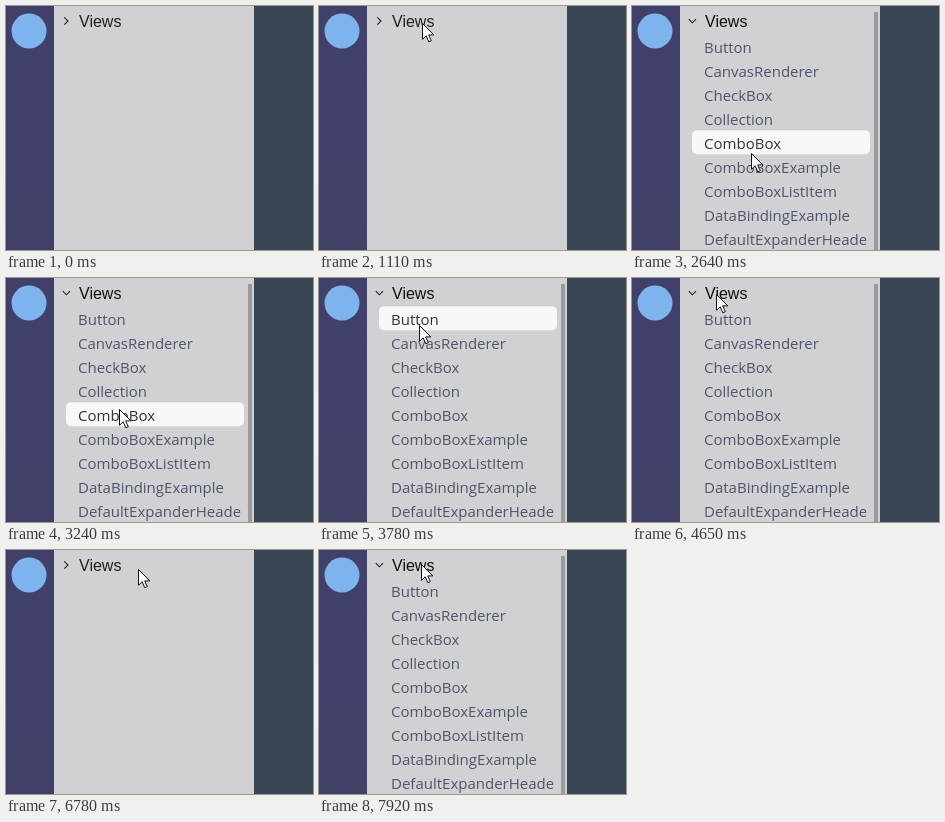
These frames come from a looping animation (307x244 px, 8 s). An HTML page:

```html
<!DOCTYPE html>
<html lang="en">
<head>
<meta charset="utf-8">
<title>Tree menu</title>
<style>
  html, body { margin: 0; width: 100%; height: 100%; overflow: hidden; background: #394552; }
  svg { display: block; width: 307px; height: 244px; }
  .title { font: 16px "Liberation Sans", Arial, sans-serif; fill: #202022; }
  .open .title { fill: #101010; }
  .item { font: 15px "Open Sans", "Noto Sans", sans-serif; fill: #4b566a; }
  .item.on { fill: #333; }
  .arrow { fill: none; stroke: #222; stroke-width: 1.1; }
  #list, #down { display: none; }
  .open #list, .open #down { display: inline; }
  .open #right { display: none; }
</style>
</head>
<body>
<svg id="stage" viewBox="0 0 307 244">
  <defs>
    <linearGradient id="rail" x2="0" y2="1">
      <stop offset="0" stop-color="#40406a"/>
      <stop offset="1" stop-color="#414168"/>
    </linearGradient>
    <clipPath id="clip"><rect x="60" y="28" width="174.5" height="216"/></clipPath>
  </defs>
  <rect width="307" height="244" fill="#394552"/>
  <rect width="48" height="244" fill="url(#rail)"/>
  <rect x="48" width="200" height="244" fill="#d1d1d3"/>
  <circle cx="23" cy="25" r="17.5" fill="#7db4ee"/>
  <path id="right" class="arrow" d="M58.3 11.3 62 15 58.3 18.7"/>
  <path id="down" class="arrow" d="M56.8 13.2 60.4 16.8 64 13.2"/>
  <text class="title" x="73" y="21">Views</text>
  <g id="list">
    <rect id="hover" x="60" width="178" height="24" rx="5" fill="#f8f8f8"/>
    <g id="items" clip-path="url(#clip)"></g>
    <rect x="242" y="6" width="4" height="240" fill="#9b9b9d"/>
  </g>
  <path id="cursor" d="M.5 .5V16.3L4.2 12.8 6.8 18.8 9.3 17.7 6.7 11.9H11.9Z" fill="#fff" stroke="#111" stroke-width="1"/>
</svg>
<script>
const LOOP = 8000, STEP = 30, TOP = 28.3, ROW = 24;
const names = ["Button", "CanvasRenderer", "CheckBox", "Collection", "ComboBox",
  "ComboBoxExample", "ComboBoxListItem", "DataBindingExample", "DefaultExpanderHeader"];

// time, x, y of the pointer tip
const path = [
  [0, 312, 35], [360, 312, 35], [1110, 103, 17], [1890, 103, 17],
  [2370, 124, 68], [2700, 118, 157], [2910, 118, 170], [3090, 118, 170],
  [3240, 113, 131], [3900, 98, 36], [4290, 94, 15], [4470, 94, 15],
  [4650, 84, 16], [5580, 84, 16], [5970, 132, 19], [6750, 132, 19],
  [7200, 102, 14], [LOOP, 102, 14]
];

const $ = id => document.getElementById(id);
const items = names.map((name, i) => {
  const el = document.createElementNS("http://www.w3.org/2000/svg", "text");
  el.setAttribute("x", 72);
  el.setAttribute("y", 47 + i * ROW);
  el.textContent = name;
  $("items").append(el);
  return el;
});

const slope = (i, k) => (path[i + 1][k] - path[i][k]) / (path[i + 1][0] - path[i][0]);

// Smooth through moving points, at rest on turns and pauses
function tangent(i, k) {
  if (i === 0 || i === path.length - 1) return 0;
  const a = slope(i - 1, k), b = slope(i, k);
  return a * b > 0 ? 2 * a * b / (a + b) : 0;
}

function along(t, k) {
  let i = 0;
  while (i < path.length - 2 && t >= path[i + 1][0]) i++;
  const [p, q] = [path[i], path[i + 1]];
  const d = q[0] - p[0], u = (t - p[0]) / d, v = 1 - u;
  return p[k] * v * v * (1 + 2 * u) + q[k] * u * u * (3 - 2 * u)
    + d * u * v * (v * tangent(i, k) - u * tangent(i + 1, k));
}

function draw(now) {
  const t = Math.floor(now % LOOP / STEP) * STEP;
  const x = Math.round(along(t, 1)), y = Math.round(along(t, 2));
  const open = (t >= 1320 && t < 5190) || t >= 7920;
  const row = open && y >= TOP ? Math.floor((y - TOP) / ROW) : -1;
  $("stage").setAttribute("class", open ? "open" : "");
  $("cursor").setAttribute("transform", `translate(${x} ${y})`);
  $("hover").setAttribute("y", TOP + Math.max(row, 0) * ROW);
  $("hover").setAttribute("visibility", row < 0 ? "hidden" : "inherit");
  items.forEach((el, i) => el.setAttribute("class", i === row ? "item on" : "item"));
}

const start = performance.now();
function tick() {
  draw(performance.now() - start);
  requestAnimationFrame(tick);
}
tick();
</script>
</body>
</html>
```
